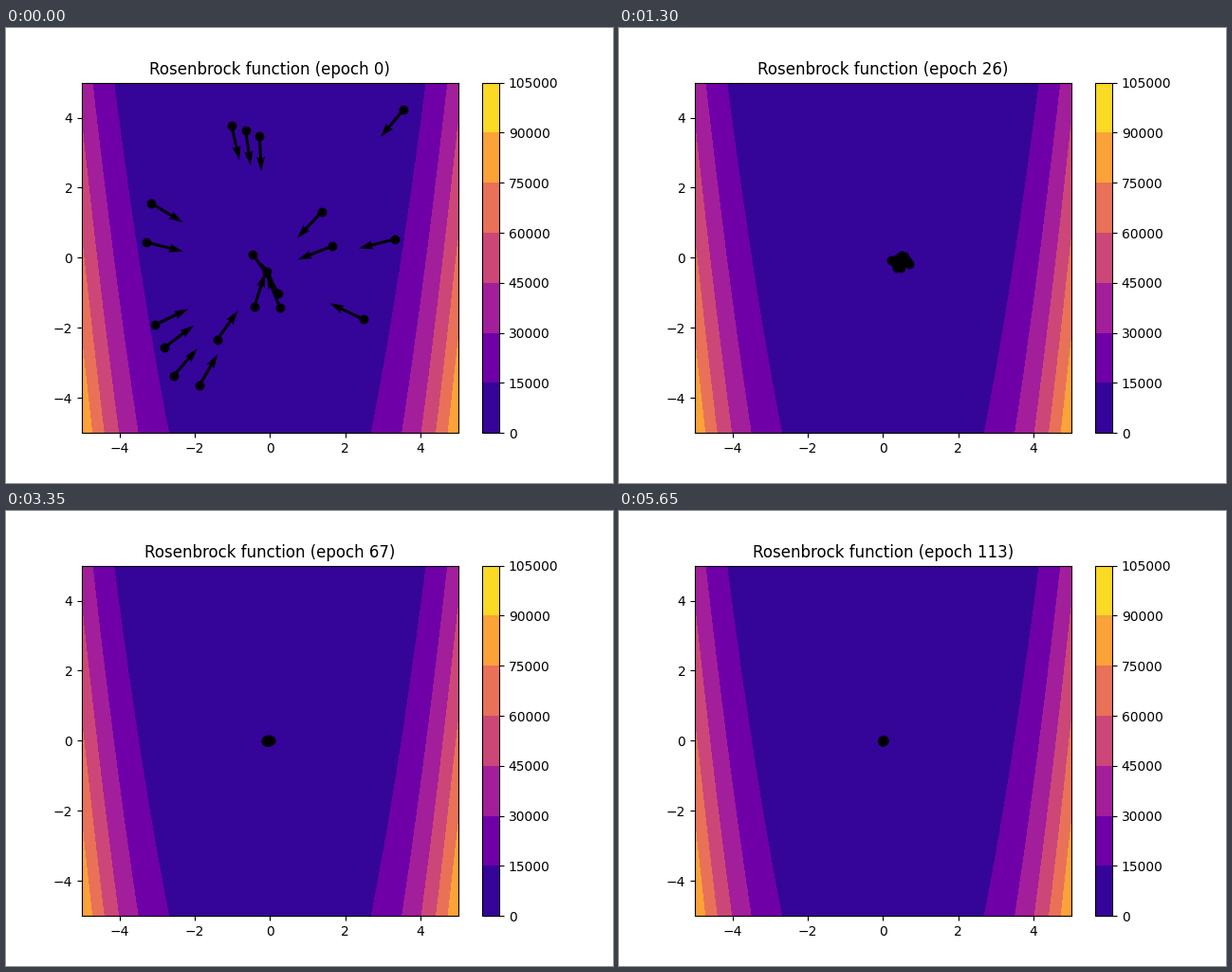
Recreate the animation shown at these times as a matplotlib script. Size 640 px wide and 480 px high, loop 5700 ms.

```python
import numpy as np
import matplotlib.pyplot as plt
from matplotlib.animation import FuncAnimation

EPOCHS = 114
OMEGA = 0.57          # swing rate around the minimum, rad per epoch
CROSS = 9             # epoch at which the swarm sweeps back through the centre
GOAL = -0.11 - 0.4j   # the swarm first heads for its best member

# Points and vectors of the plane are complex numbers: x + y j.
start = np.array([
    -1.02 + 3.77j, -0.64 + 3.64j, -0.29 + 3.47j, 3.54 + 4.23j,
    -3.16 + 1.55j, -3.26 + 0.44j, 1.38 + 1.31j, 1.65 + 0.34j,
    3.32 + 0.53j, -0.44 + 0.09j, GOAL, 0.22 - 1.02j,
    -0.41 - 1.40j, 0.27 - 1.42j, 2.48 - 1.75j, -3.06 - 1.91j,
    -2.81 - 2.56j, -1.40 - 2.34j, -2.56 - 3.37j, -1.88 - 3.64j])
n = len(start)


def unit(z):
    return z / np.maximum(abs(z), 1e-9)


def bump(t, centre, width):
    return np.exp(-((t - centre) / width) ** 2)


# Far members arrive late and slow; the others fly out the way they came.
reach = abs(start)
launch = unit(GOAL - start)
sweep = 0.006 * reach ** 2 * (1 + 0.2 * start.imag) * start
sweep_speed = unit(start) * np.minimum(0.95, 6 - reach)
join = np.clip(2 * reach - 2, CROSS - np.pi / OMEGA, CROSS)

rng = np.random.default_rng(7)
gain = rng.uniform(0.75, 1.25, n)
angle = rng.uniform(0, 2 * np.pi, n)
wobble = np.cos(angle) + 0.7j * np.sin(angle)
rate = rng.uniform(0.3, 0.5, n)
phase = rng.uniform(0, 2 * np.pi, n)


def swing(t):
    a = OMEGA * (t - CROSS)
    return sweep * np.cos(a) + sweep_speed / OMEGA * np.sin(a)


def swing_rate(t):
    a = OMEGA * (t - CROSS)
    return sweep_speed * np.cos(a) - sweep * OMEGA * np.sin(a)


def approach(t):
    """Cubic path from the start onto the swing."""
    s = t / join
    return ((1 + 2 * s) * (1 - s) ** 2 * start
            + s * (1 - s) ** 2 * join * launch
            + s * s * (3 - 2 * s) * swing(join)
            + s * s * (s - 1) * join * swing_rate(join))


def drift(t):
    """Shared swing along the valley."""
    size = (0.45 * bump(t, 26, 6) + 1.4 * bump(t, 43, 6)
            + 0.25 * bump(t, 58, 12))
    return -gain * size * np.sin(OMEGA * (t - 40.1)) * (1 - 0.25j)


def jitter(t):
    size = (0.2 * bump(t, 24, 7) + 0.6 * bump(t, 32.5, 3)
            + 0.22 * bump(t, 53, 11) + 0.015)
    return size * wobble * np.sin(rate * t + phase)


def position(t):
    decay = bump(max(t, CROSS), CROSS, 11)
    base = np.where(t < join, approach(t), decay * swing(t))
    return base + drift(t) + jitter(t)


def velocity(t, eps=1e-3):
    v = (position(t + eps) - position(t)) / eps
    return v / np.maximum(abs(v), 1)


fig, ax = plt.subplots(figsize=(6.4, 4.8), dpi=100)
axis = np.linspace(-5, 5, 200)
X, Y = np.meshgrid(axis, axis)
field = ax.contourf(X, Y, X ** 2 + 100 * (Y - X ** 2) ** 2,
                    levels=np.arange(0, 105001, 15000), cmap="plasma")
fig.colorbar(field)
ax.set(xlim=(-5, 5), ylim=(-5, 5))
title = ax.set_title("")
dots = ax.scatter(start.real, start.imag, color="black")
arrows = ax.quiver(start.real, start.imag, launch.real, launch.imag,
                   color="black", angles="xy", scale_units="xy", scale=1)


def update(epoch):
    pos, vel = position(epoch), velocity(epoch)
    points = np.column_stack([pos.real, pos.imag])
    dots.set_offsets(points)
    arrows.set_offsets(points)
    arrows.set_UVC(vel.real, vel.imag)
    title.set_text(f"Rosenbrock function (epoch {epoch})")
    return dots, arrows, title


anim = FuncAnimation(fig, update, frames=EPOCHS, interval=50,
                     repeat=True, repeat_delay=0)
plt.show()
```
